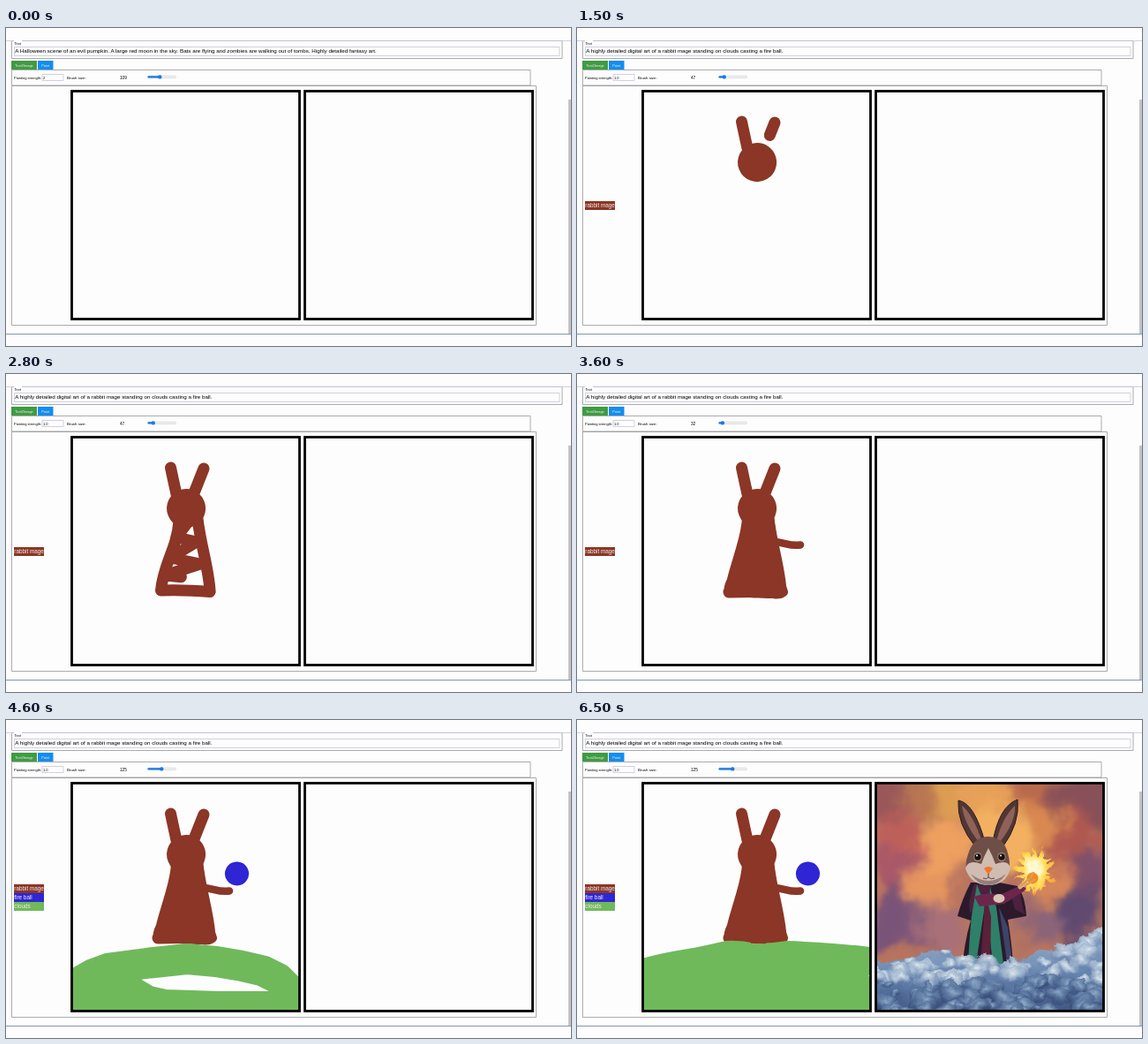
Write an HTML page that moves like this. It is 640x360 px and loops after 6.9 s.

```html
<!DOCTYPE html>
<html lang="en">
<head>
<meta charset="utf-8">
<title>Paint with words</title>
<style>
  html, body { margin: 0; width: 100%; height: 100%; overflow: hidden; background: #fdfdfd; }
  svg { display: block; width: 100vw; height: 100vh; font-family: "Liberation Sans", Arial, sans-serif; }
  .line { fill: none; stroke: #97979b; stroke-width: .8; }
  .field { fill: none; stroke: #c6c6dc; stroke-width: .8; }
  .frame { fill: none; stroke: #000; stroke-width: 2.8; }
  .small { font-size: 4px; }
  .stroke { fill: none; stroke-linecap: round; stroke-linejoin: round; }
</style>
</head>
<body>
<svg viewBox="0 0 640 360" xmlns="http://www.w3.org/2000/svg">
  <defs>
    <clipPath id="leftPane"><rect x="75" y="72" width="257" height="257"/></clipPath>
    <clipPath id="rightPane"><rect x="339" y="72" width="258" height="257"/></clipPath>
    <clipPath id="hill"><path d="M75 269.500Q100 263 120 260T168 250Q185 249 203 253 220 253 238 250 290 252 333 257V331H75Z"/></clipPath>
    <filter id="wisps" x="-20%" y="-20%" width="140%" height="140%" color-interpolation-filters="sRGB">
      <feGaussianBlur stdDeviation="7" result="blur"/>
      <feTurbulence type="fractalNoise" baseFrequency=".018" numOctaves="4" seed="4"/>
      <feDisplacementMap in="blur" scale="55" xChannelSelector="R" yChannelSelector="G"/>
    </filter>
    <filter id="ragged" x="-20%" y="-20%" width="140%" height="140%" color-interpolation-filters="sRGB">
      <feGaussianBlur stdDeviation=".7" result="blur"/>
      <feTurbulence type="fractalNoise" baseFrequency=".07" numOctaves="3" seed="9"/>
      <feDisplacementMap in="blur" scale="14" xChannelSelector="R" yChannelSelector="G"/>
    </filter>
    <linearGradient id="bank" x2="0" y2="1"><stop stop-color="#a9bdd2"/><stop offset=".45" stop-color="#6685b0"/><stop offset="1" stop-color="#2e406d"/></linearGradient>
    <radialGradient id="puff" cx=".5" cy=".3" r=".65">
      <stop offset="0" stop-color="#dde7ee"/><stop offset=".5" stop-color="#9db3cc" stop-opacity=".9"/><stop offset="1" stop-color="#4f6c9c" stop-opacity=".15"/>
    </radialGradient>
    <radialGradient id="lowPuff" cx=".5" cy=".3" r=".65">
      <stop offset="0" stop-color="#8fa9c8"/><stop offset=".5" stop-color="#547099" stop-opacity=".9"/><stop offset="1" stop-color="#25345f" stop-opacity=".25"/>
    </radialGradient>
    <radialGradient id="flame">
      <stop offset=".3" stop-color="#fff8cf"/><stop offset=".6" stop-color="#ffe05e"/><stop offset="1" stop-color="#fbab30"/>
    </radialGradient>
  </defs>

  <rect width="640" height="360" fill="#fdfdfd"/>
  <path class="line" d="M6.500 14.500H630V34.500H6.500ZM6.500 47.500H594V65H6.500ZM6.500 65.500H600.500V336.500H6.500Z"/>
  <path class="field" d="M0 14.500H640M9.500 21.500H627V31.500H9.500ZM41 52.500H65V59.500H41Z"/>
  <path d="M0 346.500H640" stroke="#8197b3" stroke-width="1.2"/>
  <rect x="637" y="81" width="3" height="265" fill="#c2c2c6"/>
  <rect x="9" y="14" width="9" height="5" fill="#fdfdfd"/>
  <text class="small" x="9.500" y="18.500">Text</text>
  <text id="prompt" x="10.300" y="28.300" font-size="6.240"></text>
  <rect x="6" y="37" width="29" height="10" fill="#3f9b42"/>
  <rect x="36" y="37" width="17.500" height="10" fill="#138df0"/>
  <g class="small" text-anchor="middle" fill="#f4f4f4"><text x="20.500" y="43.500">Text2Image</text><text x="44.700" y="43.500">Paint</text></g>
  <text class="small" x="9" y="57.500">Painting strength:</text>
  <text id="strength" class="small" x="42" y="57.500"></text>
  <text x="69" y="57.600" font-size="4.400">Brush size:</text>
  <text id="size" x="129" y="57.600" font-size="4.700"></text>
  <rect x="160.500" y="54.200" width="32" height="2.400" rx="1.200" fill="#f0f0f0" stroke="#c6c6ce" stroke-width=".5"/>
  <rect id="track" x="160.500" y="54.200" height="2.400" rx="1.200" fill="#1a78e6"/>
  <circle id="knob" cy="55.400" r="2.200" fill="#1a78e6"/>
  <g id="tags" font-size="6.350"></g>

  <g id="drawing" clip-path="url(#leftPane)"></g>

  <g id="art" clip-path="url(#rightPane)">
    <rect x="339" y="72" width="258" height="258" fill="#b8745f"/>
    <g id="sky" filter="url(#wisps)"></g>
    <g id="mage">
      <path d="M446 184Q436 203 431 222L446 227Q439 250 437 276H494Q492 248 488 226L509 222Q508 200 499 188L478 184Z" fill="#2a1a2c"/>
      <path d="M450 186Q442 205 445 218L463 212 470 188ZM490 194L502 190Q503 207 507 220L496 214Z" fill="#4d2140"/>
      <path d="M453 186L462 210 452 276H443Q445 240 447 222ZM468 190L475 212 483 276H471L465 222Z" fill="#2f8068"/>
      <path d="M462 194L469 222 468 276H457L461 224Z" fill="#5c2038"/>
      <path d="M478 212L488 234 493 274H487Z" fill="#3c4468"/>
      <path d="M450 200Q465 194 479 198L505 186 509 192 484 208 456 211Z" fill="#6c264c"/>
      <ellipse cx="478" cy="202" rx="6.500" ry="5" fill="#d8c5b4"/>
      <path d="M502 189L511 181" stroke="#d9a878" stroke-width="5" stroke-linecap="round"/>
      <g stroke="#2c1c1e" stroke-width="1">
        <path d="M452 144Q430 118 432 91 450 94 462 138Z" fill="#513636"/>
        <path d="M471 138Q478 98 499 90 502 117 482 144Z" fill="#513636"/>
      </g>
      <path d="M455 138Q438 116 436 97 448 106 459 138ZM475 137Q482 110 496 97 497 116 479 138Z" fill="#8f6258"/>
      <path d="M466 132Q484 133 488 151 494 171 482 180 466 189 450 180 436 171 443 152 449 132 466 132Z" fill="#6d4f48"/>
      <path d="M466 145Q471 154 474 163 489 157 491 168 486 187 466 187 446 187 440 168 443 157 458 163 461 154 466 145Z" fill="#d0bcb0"/>
      <path d="M446 174Q466 190 486 174 478 187 466 187 454 187 446 174Z" fill="#94807a"/>
      <g id="eyes"></g>
      <path d="M461 168Q466 164 471 168L466 175Z" fill="#f4742a"/>
      <path d="M466 174V178M460 179Q464 181 466 178 469 181 473 179" fill="none" stroke="#4a3836" stroke-width=".9"/>
    </g>
    <path id="fire" fill="url(#flame)" filter="url(#ragged)"/>
    <circle cx="516" cy="179" r="6.500" fill="#f58a1e"/>
    <path d="M504 187L513 179 517 173M507 188L518 181" stroke="#dc9c61" stroke-width="2.500" stroke-linecap="round"/>
    <g id="clouds" filter="url(#ragged)"></g>
  </g>
  <rect class="frame" x="74.500" y="71.500" width="258" height="258"/>
  <rect class="frame" x="338.500" y="71.500" width="258" height="258"/>
</svg>
<script>
const LOOP = 6900, STEP = 100;
const BROWN = '#8b3626', BLUE = '#2f25d4', GREEN = '#6fb95b';
const $ = id => document.getElementById(id);

function add(parent, name, attrs, text = '') {
  const el = document.createElementNS('http://www.w3.org/2000/svg', name);
  for (const key in attrs) el.setAttribute(key, attrs[key]);
  el.textContent = text;
  return parent.appendChild(el);
}

// Each timeline lists [start, value]; the last one begun is current.
const at = (timeline, t) => timeline.filter(([start]) => start <= t).pop()[1];
const prompts = [
  [0, 'A Halloween scene of an evil pumpkin. A large red moon in the sky. Bats are flying and zombies are walking out of tombs. Highly detailed fantasy art.'],
  [400, 'A highly detailed digital art of a rabbit mage standing on clouds casting a fire ball.']
];
const strengths = [[0, '2'], [400, '1.0']];
const sizes = [[0, 109], [500, 86], [1200, 47], [3100, 32], [4100, 125]];

const tags = [[500, 'rabbit mage', BROWN], [3700, 'fire ball', BLUE], [4100, 'clouds', GREEN]].map(([start, label, color]) => {
  const el = add($('tags'), 'g', {});
  add(el, 'rect', { x: 9, width: 34, height: 10, fill: color });
  add(el, 'text', { x: 9.3, y: 7.2, fill: '#f3eeee' }, label);
  return { el, start };
});

// start, duration, brush width, path
const rabbitStrokes = [
  [700, 400, 34, 'M207 148A5 5 0 1 0 209 153 5 5 0 0 0 207 148'],
  [1200, 200, 13, 'M186.500 106Q189 118 193 136'],
  [1400, 200, 13, 'M224 107L212.500 136'],
  [1600, 500, 13, 'M196 166C194 197 178 215 175.500 245Q200 244 231 246.500'],
  [2100, 400, 13, 'M231 246C230 222 221 196 217 164'],
  [2500, 600, 13, 'M208 165L193 185 216 190 186 208 220 215 180 228 224 232 178 240 228 246 172 247'],
  [3200, 300, 8.5, 'M222 190C235 190 240 195.500 253 193.500']
];
const ballStrokes = [[3700, 300, 14, 'M262 167.500a6.500 6.500 0 1 1 -1 0z']];
const hillStrokes = [
  [4100, 300, 35, 'M70 306L84 296 98 288 117 281 163 275 205 270.500 238 273.500 265 278 291 284 309 293 321 305'],
  [4300, 300, 35, 'M332 318L302 324.500H240L180 322.500 160 318 133 302 84 300V320H150'],
  [4700, 300, 35, 'M305 298Q240 300 142 296'],
  [5000, 200, 35, 'M72 285Q120 276 185 265'],
  [5200, 200, 35, 'M335 272Q280 268 225 266']
];
const strokes = [];
function addStrokes(parent, list, color) {
  for (const [start, duration, width, d] of list) {
    const el = add(parent, 'path', { d, class: 'stroke', pathLength: 1, stroke: color, 'stroke-width': width });
    strokes.push({ el, start, duration });
  }
}
addStrokes($('drawing'), rabbitStrokes, BROWN);
const body = add($('drawing'), 'path', {
  fill: BROWN,
  d: 'M187 160C187 180 176 208 170 232 167 238 166 243 166.500 248 168 255 175 253 182 252 195 253 205 254 222 254 230 256 240 252 239 246 237 238 233 234 232 226 231 205 226 190 223 160Z'
});
addStrokes($('drawing'), ballStrokes, BLUE);
addStrokes(add($('drawing'), 'g', { 'clip-path': 'url(#hill)' }), hillStrokes, GREEN);

let seed = 7;
const random = () => (seed = seed * 16807 % 2147483647) / 2147483647;

function paintArt() {
  const sky = [
    [349, 87, 34, '#9a5759'], [394, 90, 28, '#b87752'], [430, 95, 28, '#dc9c52'], [466, 85, 30, '#e6a058'],
    [524, 82, 32, '#b96a4c'], [575, 93, 36, '#885058'], [558, 138, 32, '#ae5850'], [532, 116, 24, '#d88850'],
    [366, 138, 32, '#be605a'], [411, 150, 30, '#eea060'], [479, 135, 40, '#f2b060'], [366, 183, 30, '#a85868'],
    [405, 195, 30, '#e6955e'], [540, 190, 34, '#d4855a'], [583, 183, 28, '#80506a'], [570, 222, 36, '#604a70'],
    [366, 232, 34, '#7a5478'], [413, 236, 28, '#a87078'], [522, 234, 26, '#8a6478']
  ];
  for (const [cx, cy, r, fill] of sky) add($('sky'), 'circle', { cx, cy, r, fill });

  for (const cx of [454, 481]) {
    add($('eyes'), 'ellipse', { cx, cy: 155, rx: 4.6, ry: 5.2, fill: '#a98a70' });
    add($('eyes'), 'circle', { cx, cy: 155, r: 3.7, fill: '#171113' });
    add($('eyes'), 'circle', { cx: cx - 1, cy: 153.5, r: 1, fill: '#fff' });
  }

  const spikes = Array.from({ length: 30 }, (_, i) => {
    const angle = i / 30 * 2 * Math.PI;
    const r = (i % 2 ? 17 : 20 + 11 * random()) * (1 - .18 * Math.sin(angle));
    return `${519 + r * .9 * Math.cos(angle)} ${174 + r * Math.sin(angle)}`;
  });
  $('fire').setAttribute('d', `M${spikes.join('L')}Z`);

  const cloudTop = x => 270 - .3 * Math.max(0, x - 490) - 12 * Math.exp(-(((x - 405) / 28) ** 2));
  const ridge = Array.from({ length: 31 }, (_, i) => `${320 + i * 10} ${cloudTop(320 + i * 10) + 4}`);
  add($('clouds'), 'path', { d: `M${ridge.join('L')}V350H320Z`, fill: 'url(#bank)' });
  const puffs = Array.from({ length: 120 }, () => {
    const cx = 330 + 276 * random(), depth = random(), rx = 7 + 10 * random();
    const top = cloudTop(cx) + 5;
    return { cx, cy: top + depth * (334 - top), rx, ry: rx * .65 };
  }).sort((a, b) => a.cy - b.cy);
  for (const puff of puffs) {
    add($('clouds'), 'ellipse', { ...puff, fill: `url(#${puff.cy > 297 ? 'lowPuff' : 'puff'})` });
  }
}
paintArt();

const show = (el, visible) => el.setAttribute('display', visible ? 'inline' : 'none');

function render(now) {
  const t = Math.floor(now % LOOP / STEP) * STEP;
  const size = at(sizes, t), knobX = 161 + size * .122;
  $('prompt').textContent = at(prompts, t);
  $('strength').textContent = at(strengths, t);
  $('size').textContent = size;
  $('knob').setAttribute('cx', knobX);
  $('track').setAttribute('width', knobX - 160.5);

  const shown = tags.filter(tag => tag.start <= t).length;
  tags.forEach(({ el }, i) => {
    show(el, i < shown);
    el.setAttribute('transform', `translate(0 ${201 - shown * 5 + i * 10})`);
  });
  for (const { el, start, duration } of strokes) {
    const progress = Math.min(1, Math.max(.001, (t - start) / duration));
    show(el, t >= start);
    el.setAttribute('stroke-dasharray', `${progress} 2`);
  }
  show(body, t >= 3100);
  show($('art'), t >= 5800);
  requestAnimationFrame(() => render(performance.now()));
}
render(performance.now());
</script>
</body>
</html>
```
